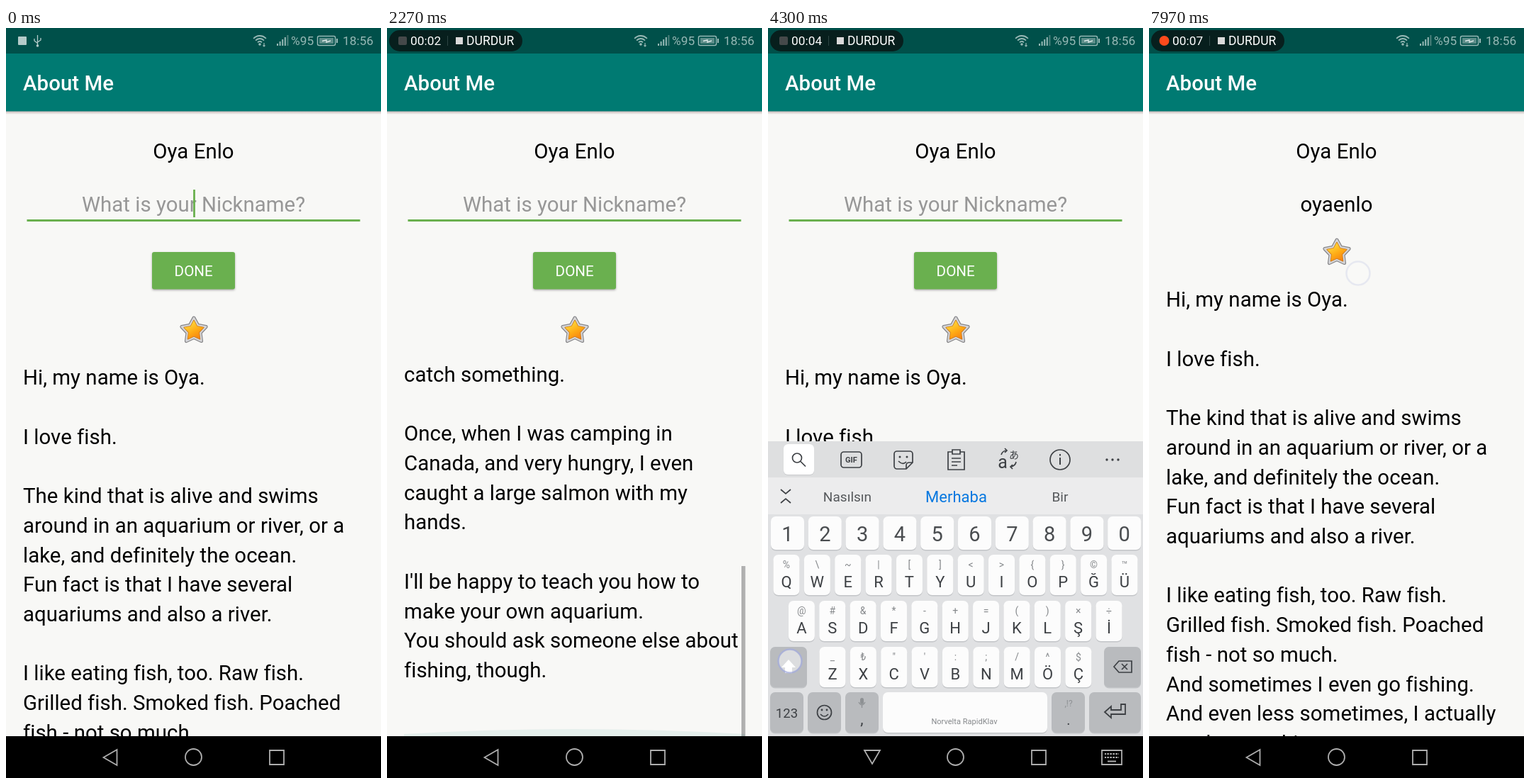
An HTML page with a canvas that plays this animation: 529 px wide and 1058 px high, repeating every 8000 ms.

```html
<!DOCTYPE html>
<html lang="en">
<head>
<meta charset="utf-8">
<title>About Me</title>
<style>
html, body { margin: 0; width: 100%; height: 100%; overflow: hidden; background: #000; }
canvas { display: block; }
</style>
</head>
<body>
<canvas width="529" height="1058"></canvas>
<script>
const g = document.querySelector('canvas').getContext('2d');
g.letterSpacing = '0.03px'; // any spacing also turns ligatures off

const LOOP = 8000, GREEN = '#6ab04f', INK = '#3d4044', LINE = 41.7;
const NICK = 'oyaenlo';
const TYPED_AT = [5170, 5430, 5700, 5920, 6070, 6220, 6370];
const SHIFT_OFF = 4450, DONE_AT = 7800;
const STORY = `Hi, my name is Oya.

I love fish.

The kind that is alive and swims
around in an aquarium or river, or a
lake, and definitely the ocean.
Fun fact is that I have several
aquariums and also a river.

I like eating fish, too. Raw fish.
Grilled fish. Smoked fish. Poached
fish - not so much.
And sometimes I even go fishing.
And even less sometimes, I actually
catch something.

Once, when I was camping in
Canada, and very hungry, I even
caught a large salmon with my
hands.

I'll be happy to teach you how to
make your own aquarium.
You should ask someone else about
fishing, though.`.split('\n');

const SCROLL = [[1590, 0], [1880, 300], [2000, 508], [2100, 630], [2450, 630],
  [2770, 454], [2830, 395], [2960, 210], [3170, 0]];
const ROWS = [
  { x: 26, y: 743, keys: 'QWERTYUIOPĞÜ', alt: '%\\~|[]<>{}©™' },
  { x: 47.4, y: 808, keys: 'ASDFGHJKLŞİ', alt: '@#&*-+=()×÷' },
  { x: 91, y: 873, keys: 'ZXCVBNMÖÇ', alt: '_₺"\':;/^$' }
];
const PITCH = 43.36;

const clamp = v => Math.max(0, Math.min(1, v));
const span = (t, a, b) => clamp((t - a) / (b - a));
const mod = (a, b) => (a % b + b) % b;

function along(keys, t) {
  let i = 0;
  while (i < keys.length - 2 && t > keys[i + 1][0]) i++;
  const [t0, v0] = keys[i], [t1, v1] = keys[i + 1];
  return v0 + (v1 - v0) * span(t, t0, t1);
}

function rect(x0, y0, x1, y1, color, r = 0) {
  g.fillStyle = color;
  g.beginPath();
  g.roundRect(x0, y0, x1 - x0, y1 - y0, r);
  g.fill();
}

function disc(x, y, r, color) {
  g.fillStyle = color;
  g.beginPath();
  g.arc(x, y, r, 0, 7);
  g.fill();
}

function stroke(d, color = INK, w = 1.7) {
  g.strokeStyle = color;
  g.lineWidth = w;
  g.stroke(new Path2D(d));
}

function ring(x, y, r, color = INK, w = 1.7) {
  stroke(`M${x - r} ${y}a${r} ${r} 0 1 0 ${2 * r} 0a${r} ${r} 0 1 0 ${-2 * r} 0`, color, w);
}

// y is the middle of the capital letters
function text(s, x, y, size, color, align = 'center', weight = 400) {
  g.font = `${weight} ${size}px Roboto, "Noto Sans", "Noto Sans CJK JP", sans-serif`;
  g.textAlign = align;
  g.fillStyle = color;
  g.fillText(s, x, y + size * .356);
  return g.measureText(s).width;
}

function clipped(x, y, w, h, draw) {
  g.save();
  g.beginPath();
  g.rect(x, y, w, h);
  g.clip();
  draw();
  g.restore();
}

function statusBar(t) {
  const c = '#98b9b6';
  rect(0, 0, 529, 36, '#00504a');
  for (const r of [4, 8, 12]) {
    g.strokeStyle = c;
    g.lineWidth = 1.8;
    g.beginPath();
    g.arc(358, 23, r, -2.4, -.74);
    g.stroke();
  }
  disc(358, 23, 1.8, c);
  stroke('M364 21v5m-1.5 -1.5l1.5 1.5l1.5 -1.5', c, 1.2);
  for (let i = 0; i < 5; i++)
    rect(382 + i * 3.6, 22 - i * 3, 384 + i * 3.6, 25, i < 4 ? c : '#4d817d');
  text('%95', 402, 18, 17.3, c, 'left');
  g.strokeStyle = c;
  g.lineWidth = 1.5;
  g.beginPath();
  g.roundRect(439.5, 11.5, 25, 13, 2);
  g.stroke();
  rect(442, 14, 462, 22, '#5c8d89');
  rect(466, 15, 468, 21, c);
  stroke('M446 18.5l6 -1.5v3l6 -2', '#dce8e7', 1.4);
  text('18:56', 475, 18, 17.3, c, 'left');

  if (t < 130) {
    rect(17, 12, 29, 24, '#b4cbc9', 1);
    stroke('M44.5 10V26M40 15v3l4.5 3.5M49 14v3l-4.5 3', '#b4cbc9', 1.3);
    disc(44.5, 25, 1.8, '#b4cbc9');
    return;
  }
  rect(3, 3, 191, 33, '#071f1d', 15);
  if (mod(t - 70, 1000) < 500) rect(16, 12, 28, 24, '#45494a', 2);
  else disc(21.5, 18, 7, '#ff4a1c');
  text('00:0' + Math.max(0, Math.floor((t - 70) / 1000)), 33, 18, 17.3, '#fff', 'left');
  rect(85, 11, 86, 25, '#2c4542');
  rect(97, 13, 107, 23, '#dadada');
  text('DURDUR', 112, 18, 17.5, '#fff', 'left');
}

function starPath(r) {
  g.beginPath();
  for (let i = 0; i < 10; i++) {
    const a = i * Math.PI / 5 - Math.PI / 2, q = i % 2 ? r * .53 : r;
    g.lineTo(q * Math.cos(a), q * Math.sin(a));
  }
  g.closePath();
}

function star(x, y) {
  g.save();
  g.translate(x, y + 1);
  g.lineJoin = 'round';
  starPath(18);
  g.strokeStyle = '#87878a';
  g.lineWidth = 5;
  g.stroke();
  g.strokeStyle = g.fillStyle = '#d6d6d8';
  g.lineWidth = 2.6;
  g.stroke();
  g.fill();
  const fill = g.createLinearGradient(-6, -12, 8, 13);
  fill.addColorStop(0, '#ffd83c');
  fill.addColorStop(.5, '#ffaa14');
  fill.addColorStop(1, '#f47a10');
  starPath(14.5);
  g.strokeStyle = '#c9781f';
  g.lineWidth = 1.6;
  g.stroke();
  g.fillStyle = fill;
  g.fill();
  g.restore();
}

function glow(y, depth) {
  g.fillStyle = 'rgba(0,122,112,.08)';
  g.beginPath();
  g.moveTo(24, y);
  g.lineTo(24, y + depth * .3);
  g.quadraticCurveTo(264, y + depth * 1.7, 505, y + depth * .3);
  g.lineTo(505, y);
  g.fill();
}

function story(t, top) {
  const scroll = along(SCROLL, t);
  clipped(0, top, 529, 999 - top, () => {
    STORY.forEach((s, i) => text(s, 24, top + 22 + i * LINE - scroll, 29.4, '#000', 'left'));
    if (t > 1590 && t < 3750) {
      const y = 472 + scroll * .4555;
      g.globalAlpha = span(t, 3750, 3500);
      rect(500, y, 505.5, y + 240, '#b0b0b0');
      g.globalAlpha = 1;
    }
    glow(999, -14 * Math.sin(Math.PI * span(t, 2100, 2330)));
    glow(top, 13 * Math.sin(Math.PI * span(t, 3100, 3400)));
  });
}

function nickname(t, typed) {
  if (t >= DONE_AT) return text(NICK, 264.5, 249, 29.4, '#000');
  let x = 265.5;
  if (typed) {
    const w = text(typed, 264.5, 249, 29.4, '#000');
    rect(264.5 - w / 2, 262, 264.5 + w / 2, 263.7, '#000');
    x += w / 2;
  } else text('What is your Nickname?', 264.5, 249, 29.4, '#979797');
  const blink = typed ? mod(t - TYPED_AT[typed.length - 1], 1000) < 500 : mod(t - 530, 1020) < 510;
  if (blink) rect(x - 1.4, 228, x + 1.4, 267, GREEN);
  rect(29.5, 270, 499.5, 273, GREEN);
}

function doneButton(t) {
  g.save();
  g.shadowColor = 'rgba(0,0,0,.3)';
  g.shadowBlur = 3;
  g.shadowOffsetY = 1.5;
  rect(206, 316, 323, 368.5, t > 7630 ? '#5fa047' : GREEN, 3);
  g.restore();
  text('DONE', 264.7, 343, 20.6, '#fff');
}

function key(x0, y0, x1, y1, color = '#fcfcfc') {
  rect(x0, y0 + 2, x1, y1 + 1.5, '#c3c5c8', 7);
  rect(x0, y0, x1, y1, color, 7);
}

function keyboardTools() {
  rect(0, 583, 529, 634, '#dedfe0');
  rect(22, 587, 65, 631, '#c9cacc', 6);
  rect(22, 587, 65, 630, '#fff', 6);
  ring(41, 606.5, 6.5);
  stroke('M46 611.5l7 7');
  stroke('M107 598h21a4 4 0 0 1 4 4v14a4 4 0 0 1 -4 4h-21a4 4 0 0 1 -4 -4v-14a4 4 0 0 1 4 -4');
  text('GIF', 117.5, 609, 11, INK, 'center', 700);
  stroke('M182 597h18a4 4 0 0 1 4 4v12l-9 9h-13a4 4 0 0 1 -4 -4v-17a4 4 0 0 1 4 -4M204 613h-5a4 4 0 0 0 -4 4v5M184 611q6 6 11 1');
  disc(186, 605, 1.5, INK);
  disc(196, 605, 1.5, INK);
  stroke('M260 598h-6v25h23v-25h-6M260 595h11v6h-11zM259 607h13M259 612h13M259 617h8');
  text('a', 331, 612, 25, INK);
  text('あ', 347, 602, 14, INK);
  stroke('M329 602q2 -6 8 -6m-3 -3l3 3l-3 3M350 612q-1 6 -8 7m3 -3l-3 3l3 3');
  ring(412, 609, 14);
  stroke('M412 606v10M412 601v2.5', INK, 2);
  for (const x of [478, 486, 494]) disc(x, 609, 1.7, INK);
}

function keyboard(t, typed) {
  const upper = t < SHIFT_OFF, dark = '#b9bbbe';
  const label = s => upper ? s : s.toLocaleLowerCase('tr');
  rect(0, 634, 529, 999, '#e0e1e3');
  keyboardTools();
  rect(0, 634, 529, 686, '#ececed');
  stroke('M18 651l7 6l7 -6M18 670l7 -6l7 6');
  const words = typed ? [typed + 'sıyla', typed, typed + 'yla'] : ['Nasılsın', 'Merhaba', 'Bir'].map(label);
  words.forEach((s, i) => text(s, [112, 265.5, 412][i], 661.5, i == 1 ? 22 : 19, i == 1 ? '#0878e0' : '#55585b'));

  [...'1234567890'].forEach((s, i) => {
    const x = 27.5 + i * 52.8;
    key(x - 23.5, 689, x + 23.5, 736);
    text(s, x, 714, 29, '#4a4d50');
  });
  for (const { x, y, keys, alt } of ROWS)
    [...keys].forEach((s, i) => {
      const cx = x + i * PITCH;
      key(cx - 18.5, y, cx + 18.5, y + 57);
      text(alt[i], cx, y + 14, 14, '#85888b');
      text(label(s), cx, y + 38, 22, INK);
    });

  key(3, 873, 55, 930, dark);
  const arrow = 'M29 891l10 11h-5v8h-10v-8h-5z';
  if (upper) {
    g.fillStyle = '#fff';
    g.fill(new Path2D(arrow));
  } else stroke(arrow);
  key(474, 873, 526, 930, dark);
  stroke('M488 901l7 -8h18v16h-18zM499 897l8 8m0 -8l-8 8');

  for (const [a, b] of [[3, 50], [56, 103], [109, 156], [400, 447], [453, 526]]) key(a, 937, b, 994, dark);
  key(162, 937, 394, 994);
  text('123', 26.5, 966, 18.5, INK);
  ring(79.5, 965.5, 10);
  disc(76, 962, 1.4, INK);
  disc(83, 962, 1.4, INK);
  stroke('M74 968q5.5 6 11 0');
  rect(130, 945, 135, 954, '#8e9194', 2.5);
  stroke('M128 951q4.5 8 9 0M132.5 955v4', '#8e9194', 1.3);
  text(',', 132.5, 974, 22, INK);
  text('Norvelta RapidKlav', 277, 978, 11, '#85888b');
  text(',!?', 424, 953, 12, '#8e9194');
  text('.', 424, 976, 20, INK);
  stroke('M475 965l9 -8v5h14v-8h6v14h-20v5z', INK, 1.8);
}

function navBar(open) {
  const c = '#aeaeae';
  rect(0, 999, 529, 1058, '#000');
  stroke(open ? 'M136 1019h22l-11 19z' : 'M156.5 1018v22l-19 -11z', c, 1.8);
  ring(264.5, 1028.5, 11.5, c, 1.8);
  stroke('M372 1019h20v20h-20z', c, 1.8);
  if (!open) return;
  stroke('M471 1019h28v20h-28zM475 1024h20M475 1029h20', c, 1.8);
  stroke('M479 1034.5h12', c, 2);
  for (let x = 477; x < 497; x += 4) rect(x, 1022, x + 1.3, 1031, '#000');
}

function touch(t, x, y, from, to, fade = 200) {
  if (t < from || t > to + fade) return;
  g.globalAlpha = 1 - span(t, to, to + fade);
  disc(x, y, 16, 'rgba(255,255,255,.5)');
  ring(x, y, 16.5, 'rgba(165,172,220,.75)', 2.5);
  g.globalAlpha = 1;
}

function touches(t) {
  touch(t, 447, along([[1530, 890], [1590, 860], [1900, 576]], t), 1530, 1920);
  touch(t, along([[2380, 400], [2770, 375], [2850, 368]], t),
    along([[2380, 600], [2450, 618], [2770, 800], [2850, 872]], t), 2380, 2840);
  touch(t, 275, 250, 3500, 3600);
  touch(t, 31, 893, 4290, 4440);
  [...NICK].forEach((s, i) => {
    for (const { x, y, keys } of ROWS) {
      const col = [...keys].indexOf(s.toUpperCase());
      if (col >= 0) touch(t, x + col * PITCH - 1, y + 25, TYPED_AT[i] - 80, TYPED_AT[i], 130);
    }
  });
  touch(t, 295, 346, 7600, 7830);
}

function draw(t) {
  const done = t >= DONE_AT;
  const typed = NICK.slice(0, TYPED_AT.filter(k => t >= k).length);
  const shown = done ? 1 - span(t, DONE_AT, 7930) : 1 - (1 - span(t, 3700, 3980)) ** 2;

  rect(0, 0, 529, 1058, '#f8f8f6');
  const shade = g.createLinearGradient(0, 117, 0, 122);
  shade.addColorStop(0, 'rgba(130,95,95,.45)');
  shade.addColorStop(1, 'rgba(130,95,95,0)');
  rect(0, 117, 529, 122, shade);
  rect(0, 36, 529, 117.5, '#007a72');
  text('About Me', 24, 78, 29.4, '#fff', 'left', 500);
  statusBar(t);

  text('Oya Enlo', 264.5, 174, 29.4, '#000');
  nickname(t, typed);
  if (!done) doneButton(t);
  star(265, done ? 316 : 426);
  story(t, done ? 361 : 471);

  if (shown > 0) clipped(0, 0, 529, 999, () => {
    g.translate(0, 416 * (1 - shown));
    keyboard(t, typed);
  });
  navBar(t > 3700 && !done);
  touches(t);
}

function tick() {
  draw(performance.now() % LOOP);
  requestAnimationFrame(tick);
}
tick();
</script>
</body>
</html>
```
